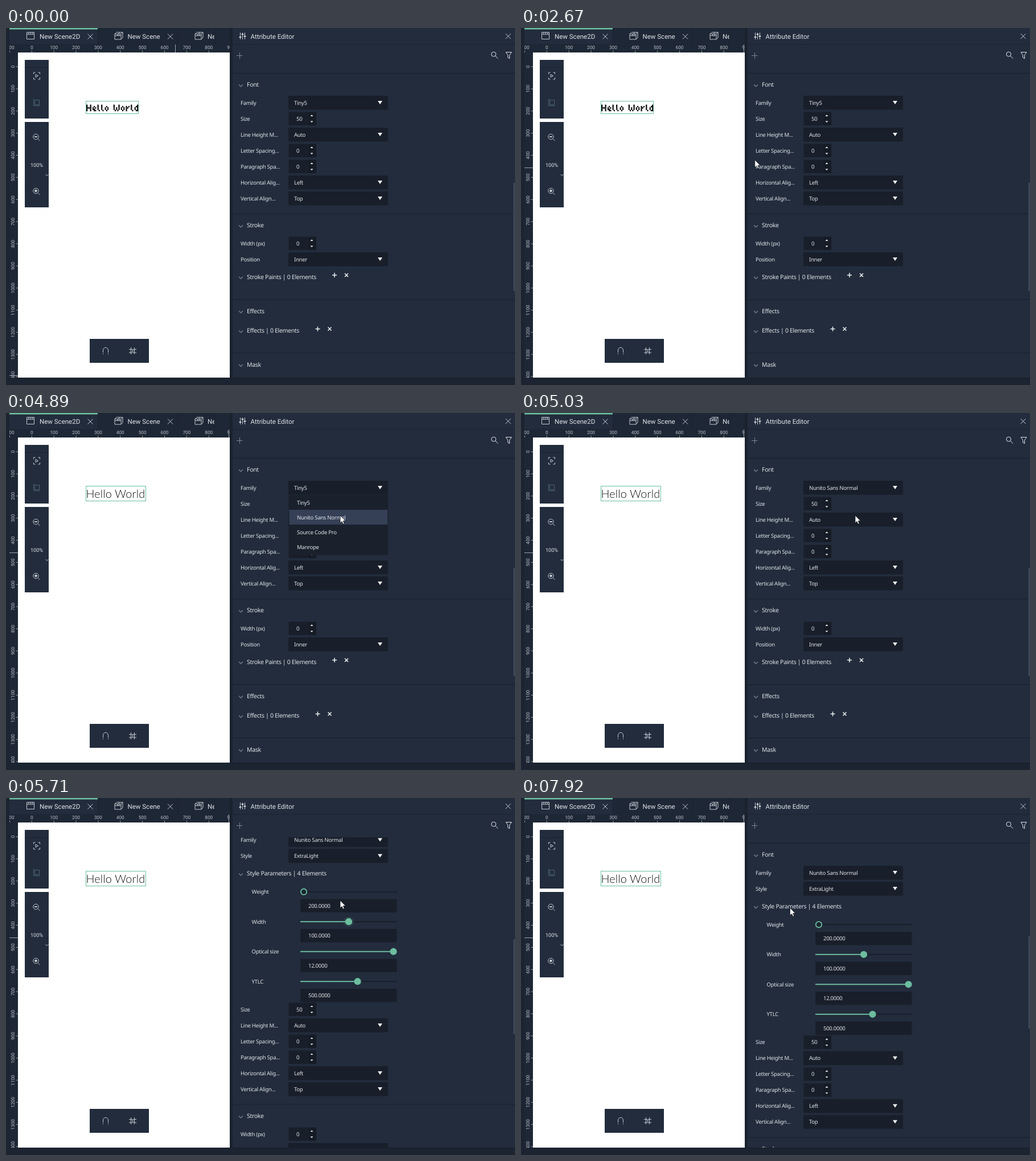
An HTML page that plays this animation: 894x627 px, repeating every 8 s.

```html
<!DOCTYPE html>
<html lang="en">
<head>
<meta charset="utf-8">
<title>Attribute Editor</title>
<style>
html, body { margin: 0; width: 100%; height: 100%; overflow: hidden; background: #1c2431; }
svg { display: block; width: 894px; height: 627px; }
text { fill: #dfe3e8; white-space: pre; text-rendering: geometricPrecision; }
.ui { font: 9.55px "Noto Sans", "Open Sans", sans-serif; letter-spacing: -.03em; }
.head { font: 10.5px "Noto Sans", "Open Sans", sans-serif; letter-spacing: -.03em; }
.tab { font: 11.5px Roboto, Arial, sans-serif; }
.rule { font: 8.3px Roboto, Arial, sans-serif; fill: #b9c0c9; text-anchor: middle; }
.zoom { font: 9.2px Roboto, Arial, sans-serif; text-anchor: middle; }
.light { font: 300 19.8px Lato, "Open Sans", sans-serif; letter-spacing: .15px; fill: #111; }
.ico { fill: none; stroke: #c3c9d1; stroke-width: 1; }
.white { fill: none; stroke: #eef1f4; stroke-width: 1.5; }
.solid { fill: #f0f2f5; }
.chev { fill: none; stroke: #667180; stroke-width: 1.7; }
.mark { stroke: #9aa3ae; }
.tick { stroke: #8d96a2; }
</style>
</head>
<body>
<svg id="stage" viewBox="0 0 894 627">
  <defs>
    <clipPath id="paneClip"><rect x="398" y="69" width="496" height="545"/></clipPath>
    <clipPath id="topClip"><rect x="6" y="28" width="387" height="15"/></clipPath>
    <clipPath id="sideClip"><rect x="6" y="43" width="15" height="571"/></clipPath>
    <clipPath id="tabClip"><rect x="304" y="0" width="62" height="28"/></clipPath>
    <g id="scene" class="ico">
      <path d="M-7 -3.500H4V6H-7ZM-7 -.500H4M-7 -3.500L-4 -6.500H7L4 -3.500M7 -6.500V3L4 6M-3 -.500L-1.500 -3.500M0 -.500L1.500 -3.500M-1 -3.500L2 -6.500"/>
    </g>
    <path id="cross" class="ico" d="M-4.500 -4.500L4.500 4.500M4.500 -4.500L-4.500 4.500"/>
    <g id="lens" class="ico"><circle r="4.700"/><path d="M3.500 3.500L7 7"/></g>
  </defs>

  <rect width="894" height="627" fill="#1c2431"/>
  <rect x="6" width="387" height="614" fill="#1e2735"/>
  <rect x="6" width="155" height="28" fill="#222c3c"/>
  <rect x="6" width="155" height="2.500" fill="#6cbe9f"/>
  <path d="M161.500 0V28M301.500 0V28M366.500 0V28" stroke="#1a212d"/>
  <g class="ico"><path d="M36.500 7.500H49.500V19.500H36.500ZM36.500 11H49.500M39 11L40.500 7.500M42.500 11L44 7.500M46 11L47.500 7.500"/></g>
  <use href="#scene" x="198" y="14"/><use href="#scene" x="339" y="14"/>
  <text class="tab" x="59" y="18.500">New Scene2D</text>
  <text class="tab" x="213.500" y="18.500">New Scene</text>
  <text class="tab" x="354" y="18.500" clip-path="url(#tabClip)">New Scene</text>
  <use href="#cross" x="148" y="15"/><use href="#cross" x="288.500" y="15"/>
  <rect x="21" y="43" width="372" height="571" fill="#fff"/>
  <g id="top" clip-path="url(#topClip)"></g>
  <g id="side" clip-path="url(#sideClip)"></g>
  <path id="markX" class="mark" d="M.500 29V43"/>
  <path id="markY" class="mark" d="M6 .500H21"/>

  <g fill="#222c3c">
    <rect x="33" y="56" width="42" height="103"/>
    <rect x="33" y="165" width="42" height="150"/>
    <rect x="147" y="546" width="104" height="42"/>
  </g>
  <path d="M33 69.500H75" stroke="#1b2330"/>
  <path class="ico" d="M48.500 81V78H51.500M56.500 78H59.500V81M59.500 87V90H56.500M51.500 90H48.500V87M52 81.500L56.500 84L52 86.500Z"/>
  <path class="ico" style="stroke:#4b666f" d="M48.500 124V136.500H60M50.500 126.500H58.500V134.500H50.500Z"/>
  <use href="#lens" x="52.500" y="191"/><path class="white" d="M50 191H55"/>
  <text class="zoom" x="54" y="243.500">100%</text>
  <path class="ico" d="M69.500 257L72 259.500L74.500 257"/>
  <use href="#lens" x="52.500" y="286"/><path class="white" d="M50 286H55M52.500 283.500V288.500"/>
  <path class="ico" d="M170.500 570V566A4.500 4.800 0 0 1 179.500 566V570M170.500 571.500V573M179.500 571.500V573"/>
  <path class="ico" d="M219.500 561V573M225.500 561V573M216 564.500H229M216 570H229"/><circle cx="222.500" cy="567.200" r="1" fill="#fff"/>

  <g id="pixel" role="img" aria-label="Hello World"><rect x="140.500" y="128.500" width="92" height="22" fill="none" stroke="#6cbe9f"/></g>
  <g id="thin"><rect x="140.500" y="128.500" width="105" height="26" fill="none" stroke="#6cbe9f"/><text class="light" x="140.500" y="149">Hello World</text></g>

  <rect x="393" width="5" height="614" fill="#1a222e"/>
  <rect x="398" width="496" height="614" fill="#222c3c"/>
  <g id="pane" clip-path="url(#paneClip)"></g>
  <rect x="398" y="28" width="496" height="1.500" fill="#1d2532"/>
  <path class="ico" d="M411.500 8V20M415.500 8V20M419.500 8V20"/>
  <path class="white" d="M409.500 16H413.500M413.500 11H417.500M417.500 14.500H421.500"/>
  <text class="tab" x="429.500" y="18.500">Attribute Editor</text>
  <use href="#cross" x="882" y="14.500"/>
  <path class="ico" style="stroke:#7b8592" d="M405 48.500H415.500M410.500 43V54"/>
  <g class="ico" style="stroke:#e1e5ea"><circle cx="856.500" cy="46" r="4"/><path d="M859.500 49L864 53.500M878 42.500H888L884.500 47.500V53.500L881.500 52V47.500Z"/></g>
  <rect id="bar" x="891" width="3" fill="#3b4558"/>
  <rect y="614" width="894" height="13" fill="#1c2431"/>
  <rect x="398" y="614" width="496" height="1.500" fill="#19202b"/>

  <g id="menu">
    <rect x="497" y="144" width="174" height="105.500" fill="#1a212c"/>
    <rect id="hover" x="497.500" width="172.500" height="26"/>
  </g>
  <path id="arrow" fill="#fff" stroke="#161a20" stroke-width=".8" d="M0 0V13.200L3 10.400L5 15L7.200 14L5.200 9.600H9.300Z"/>
  <path id="beam" fill="none" stroke="#e8ebee" stroke-width="1.100" d="M-3.500 -6H-1L0 -5L1 -6H3.500M0 -5V5M-3.500 6H-1L0 5L1 6H3.500"/>
</svg>
<script>
const $ = id => document.getElementById(id);

function add(parent, tag, attrs, text) {
  const e = document.createElementNS('http://www.w3.org/2000/svg', tag);
  for (const k in attrs) e.setAttribute(k, attrs[k]);
  if (text) e.textContent = text;
  return parent.appendChild(e);
}
const group = parent => add(parent, 'g');
const box = (p, x, y, width, height, fill, rx = 0) => add(p, 'rect', { x, y, width, height, fill, rx });
const label = (p, x, y, s, cls = 'ui') => add(p, 'text', { x, y: y + 3.5, class: cls }, s);
const path = (p, d, cls) => add(p, 'path', { d, class: cls });
const INPUT = '#191f2a', GREEN = '#6cbe9f';

// Rulers
for (let i = -1; i < 15; i++) {
  const x = 45.3 + i * 38.87, y = 68 + i * 38.87;
  add($('top'), 'text', { x, y: 37.3, class: 'rule' }, String(i * 100));
  path($('top'), `M${x} 39.500V43`, 'tick');
  add($('side'), 'text', { transform: `translate(14.7 ${y}) rotate(-90)`, class: 'rule' }, String(i * 100));
  path($('side'), `M17.500 ${y}H21`, 'tick');
}

// Pixel lettering
const GLYPHS = {
  H: '#..# #..# #### #..# #..#', e: '... .#. #.# ##. .##',
  l: '#. #. #. #. .#', o: '... .#. #.# #.# .#.',
  W: '#...# #...# #.#.# #.#.# .#.#.', r: '... #.# ##. #.. #..',
  d: '..# .## #.# #.# .##', ' ': '..'
};
let pen = 141;
const DOT = 2.17;
for (const ch of 'Hello World') {
  const rows = GLYPHS[ch].split(' ');
  rows.forEach((row, r) => [...row].forEach((c, i) => {
    if (c === '#') box($('pixel'), pen + i * DOT, 134.6 + r * 2.3, DOT + .1, 2.4, '#0a0a0a');
  }));
  pen += (rows[0].length + 1) * DOT;
}

// Attribute rows, each placed by its centre line
function section(p, y, title) {
  box(p, 398, y - 21, 496, 2, '#1d2532');
  heading(p, y, title);
}
function heading(p, y, title) {
  path(p, `M409 ${y - .2}L412.500 ${y + 3.3}L416 ${y - .2}`, 'chev');
  label(p, 423, y + .3, title, 'head');
}
function combo(p, y, name, value) {
  label(p, 412, y, name);
  box(p, 496, y - 12, 175, 24.5, INPUT, 1);
  path(p, `M653 ${y - 3}H661L657 ${y + 3}Z`, 'solid');
  return label(p, 506, y, value);
}
function spin(p, y, name, value) {
  label(p, 412, y, name);
  box(p, 496.5, y - 11.5, 34, 23.5, INPUT, 1);
  box(p, 530.5, y - 11.5, 14.5, 23.5, '#161c26', 1);
  label(p, 510, y, value);
  path(p, `M534.500 ${y - 4}H539.500L537 ${y - 6.7}ZM534.500 ${y + 4.5}H539.500L537 ${y + 7}Z`, 'solid');
}
function list(p, y, title, x) {
  heading(p, y, title);
  path(p, `M${x - 4} ${y - 3}H${x + 4}M${x} ${y - 7}V${y + 1}M${x + 18} ${y - 6}L${x + 24} ${y}M${x + 24} ${y - 6}L${x + 18} ${y}`, 'white');
}
function slider(p, y, name, value, x) {
  const caption = label(p, 431.5, y, name);
  box(p, 517, y - 1, 169.5, 2, '#181f2a');
  if (x > 523) box(p, 517, y - 1, x - 517, 2, GREEN);
  const halo = add(p, 'circle', { cx: x, cy: y, r: 9, fill: GREEN, opacity: 0 });
  const knob = add(p, 'circle', { cx: x, cy: y, r: 5.2, fill: x > 523 ? GREEN : '#1c2532', stroke: GREEN, 'stroke-width': 1.8 });
  const field = group(p);
  box(field, 517, y + 12.7, 169.5, 23.5, INPUT, 1);
  label(field, 531, y + 24.5, value);
  return { caption, halo, knob, field };
}

const font = group($('pane')), style = group($('pane')), more = group($('pane')), rest = group($('pane'));
section(font, 99.5, 'Font');
const family = combo(font, 131, 'Family', 'Tiny5');
combo(style, 159, 'Style', 'ExtraLight');
heading(style, 190.3, 'Style Parameters | 4 Elements');
const weight = slider(style, 222.3, 'Weight', '200.0000', 523);
const width = slider(more, 274.8, 'Width', '100.0000', 602);
const optical = slider(more, 327.3, 'Optical size', '12.0000', 680.5);
const ytlc = slider(more, 379.8, 'YTLC', '500.0000', 617.5);
spin(rest, 159, 'Size', '50');
combo(rest, 187, 'Line Height M...', 'Auto');
spin(rest, 215, 'Letter Spacing...', '0');
spin(rest, 243, 'Paragraph Spa...', '0');
combo(rest, 271, 'Horizontal Alig...', 'Left');
combo(rest, 299, 'Vertical Align...', 'Top');
section(rest, 346.5, 'Stroke');
spin(rest, 378, 'Width (px)', '0');
combo(rest, 406, 'Position', 'Inner');
list(rest, 437, 'Stroke Paints | 0 Elements', 577);
section(rest, 497, 'Effects');
list(rest, 531.5, 'Effects | 0 Elements', 547.5);
section(rest, 591, 'Mask');
['Tiny5', 'Nunito Sans Normal', 'Source Code Pro', 'Manrope']
  .forEach((s, i) => label($('menu'), 511, 157 + i * 26, s));

// Screen refreshes: [time, refreshes until the next entry]
const BEATS = [[0, 1], [120, 8], [1050, 1], [1180, 2], [1450, 5], [2120, 1], [2250, 7], [3210, 1],
  [3350, 2], [3740, 1], [3920, 1], [4210, 5], [4890, 2], [5170, 1], [5310, 3], [5710, 4],
  [6300, 1], [6430, 8], [7370, 1], [7520, 3], [7920, 1], [8000, 1]];
// [time, x, y]
const POINTER = [[120, 886, 498], [480, 740, 240], [700, 590, 84], [850, 539, 120], [1050, 588, 135],
  [1180, 545, 150], [1450, 389, 253.5], [1720, 335, 296], [2120, 305, 290], [2385, 340, 272], [2660, 410, 232],
  [3000, 579, 148], [3210, 566, 130], [4210, 566, 134], [4620, 587, 180], [5710, 587, 180],
  [6300, 554, 192], [6900, 430, 200], [7370, 550, 195], [7520, 562, 191], [7920, 472.5, 193]];
const MARKERS = [[1320, 297, 610], [1450, 386, 191], [1720, 350, 268], [2120, 305, 290], [2385, 320, 282], [2660, 391, 245]];
// [time, scroll, bar top, bar height]
const SCROLL = [[5310, 112, 259, 178], [5443, 112, 254, 172], [5710, 57.6, 248, 167], [6300, 0, 243, 162]];

function snap(t) {
  const i = BEATS.findIndex((b, k) => k + 1 === BEATS.length || t < BEATS[k + 1][0]);
  const [from, n] = BEATS[i], step = (BEATS[i + 1][0] - from) / n;
  return from + Math.floor((t - from) / step + 1e-6) * step;
}
function at(keys, t) {
  const i = keys.findIndex(k => k[0] > t);
  if (i === 0) return keys[0].slice(1);
  if (i < 0) return keys[keys.length - 1].slice(1);
  const a = keys[i - 1], b = keys[i], f = (t - a[0]) / (b[0] - a[0]);
  return a.slice(1).map((v, k) => v + (b[k + 1] - v) * f);
}
const show = (e, on) => e.setAttribute('display', on ? 'inline' : 'none');
const move = (e, x, y) => e.setAttribute('transform', `translate(${x} ${y})`);

function draw(ms) {
  const t = snap(ms) + .01;
  const [px, py] = at(POINTER, t), [mx, my] = at(MARKERS, t);
  const typing = t >= 5310 && t < 5440;
  show($('arrow'), t >= 120 && !typing);
  show($('beam'), typing);
  move($('arrow'), px, py);
  move($('beam'), px + 1, py + 1);
  move($('markX'), Math.round(mx), 0);
  move($('markY'), 0, Math.round(my));

  const open = t >= 3540 && t < 5030;
  show($('menu'), open);
  $('menu').setAttribute('opacity', t < 3740 ? .7 : 1);
  $('hover').setAttribute('y', py < 170 ? 144 : 170);
  $('hover').setAttribute('fill', t < 3920 ? '#3c4655' : '#354057');

  const thin = t >= 4754;
  show($('pixel'), !thin);
  show($('thin'), thin);

  // Parameter rows appear squeezed, then unfold and scroll back
  const full = t >= 5170, squeezed = full && t < 5440;
  const [scroll, barY, barH] = full ? at(SCROLL, t) : [0, 272, 190];
  const lost = !squeezed ? 0 : t < 5310 ? 53 : 49;
  family.textContent = t < 5030 ? 'Tiny5' : 'Nunito Sans Normal';
  show(style, full);
  show(more, full);
  move(font, 0, -scroll);
  move(style, 0, -scroll);
  move(more, 0, -scroll - lost);
  move(rest, 0, full ? 269.7 - scroll - lost : 0);
  weight.caption.textContent = squeezed ? 'Slider:' : 'Weight';
  show(weight.field, !squeezed);
  for (const s of [width, optical]) s.knob.setAttribute('fill', squeezed ? '#26483f' : GREEN);
  ytlc.halo.setAttribute('opacity', squeezed ? .25 : 0);
  width.halo.setAttribute('opacity', t >= 5440 && t < 5850 ? .12 : 0);
  $('bar').setAttribute('y', barY);
  $('bar').setAttribute('height', barH);
}

const start = performance.now();
function loop() {
  draw((performance.now() - start) % 8000);
  requestAnimationFrame(loop);
}
loop();
</script>
</body>
</html>
```
